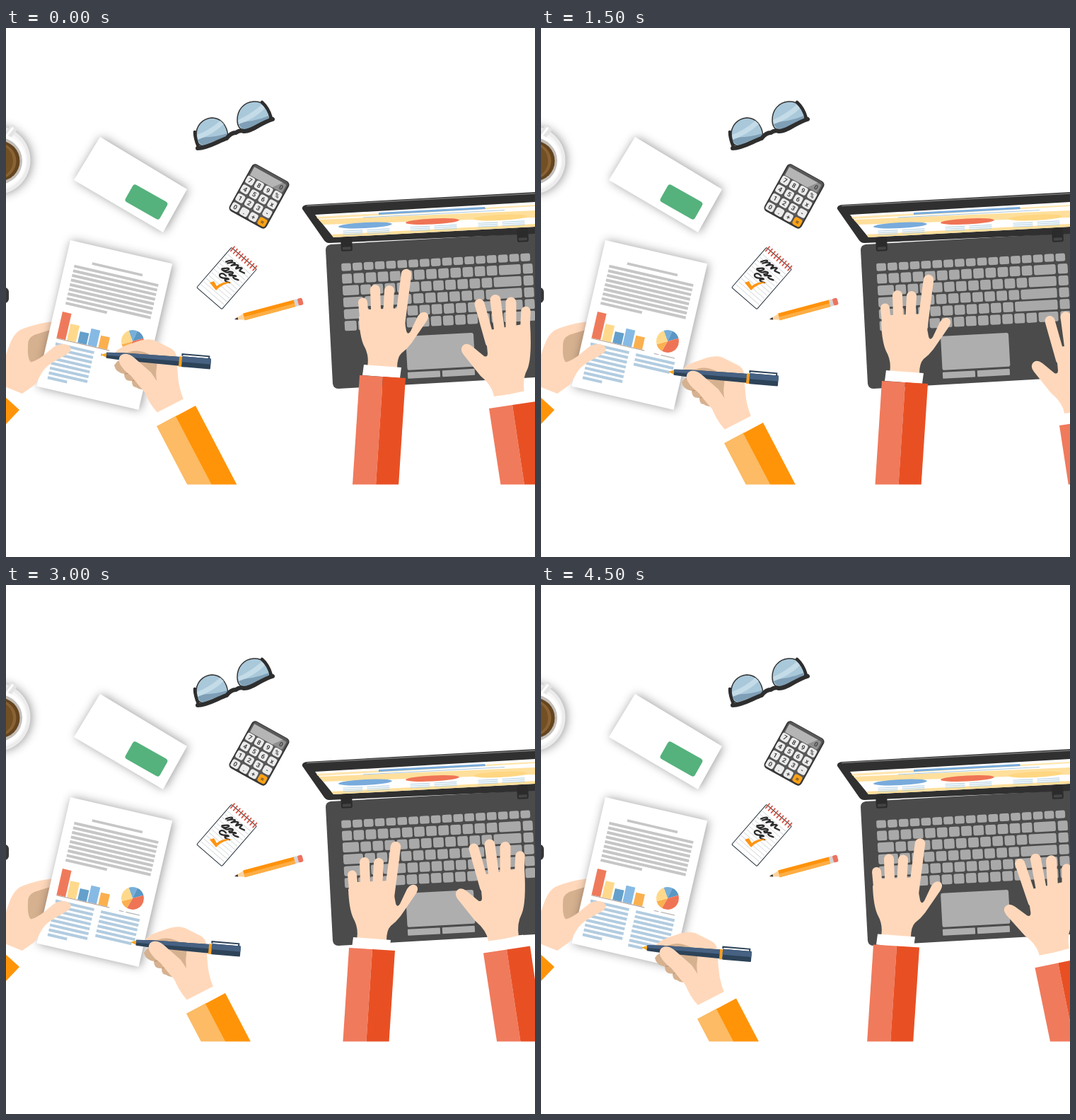
These frames come from a looping animation (748x748 px, 5000 ms). An HTML page:

```html
<!DOCTYPE html>
<html lang="en">
<head>
<meta charset="utf-8">
<title>Desk</title>
<style>
html, body { margin: 0; width: 100%; height: 100%; overflow: hidden; background: #fff; }
svg { display: block; width: 100vw; height: 100vh; }
text { font: 700 9px Roboto, sans-serif; text-anchor: middle; fill: #444; }
.soft { filter: drop-shadow(2px 0 7px #0006); }
.skin { fill: #ffd8bb; }
.finger { stroke: #ffd8bb; stroke-linecap: round; }
.shade { fill: #d6b190; }
</style>
</head>
<body>
<svg id="stage" viewBox="0 0 748 748"></svg>
<script>
const rect = (x, y, w, h, fill, r = 0) =>
  `<rect x="${x}" y="${y}" width="${w}" height="${h}" rx="${r}" fill="${fill}"/>`;
const path = (d, fill, more = '') => `<path d="${d}" fill="${fill}" ${more}/>`;
const poly = (points, fill) => `<polygon points="${points}" fill="${fill}"/>`;
const circle = (x, y, r, fill) => `<circle cx="${x}" cy="${y}" r="${r}" fill="${fill}"/>`;
const stroke = (d, color, width, more = '') =>
  `<path d="${d}" fill="none" stroke="${color}" stroke-width="${width}" ${more}/>`;
const group = (transform, body) => `<g transform="${transform}">${body}</g>`;
const repeat = (n, make) => Array.from({ length: n }, (_, i) => make(i)).join('');
const round = 'stroke-linecap="round" stroke-linejoin="round"';
const finger = (d, width) => `<path class="finger" d="${d}" stroke-width="${width}"/>`;
const skin = d => `<path class="skin" d="${d}"/>`;
const shade = d => `<path class="shade" d="${d}"/>`;

function cup() {
  return `<g class="soft">${circle(-14, 187, 48.5, '#ececec')}</g>` +
    circle(-13, 187, 43, '#f7f7f7') +
    group('translate(-4 160) rotate(-53)', rect(0, -5, 27, 11, '#e4e4e4', 4) + rect(4, -2, 20, 3, '#fff', 1)) +
    circle(-10, 188, 38, '#fff') + circle(-10, 188, 33, '#c2bdb8') +
    circle(-9, 188, 28.5, '#65451f') + circle(-11, 188, 25.5, '#8a6233') + circle(-14, 188, 24, '#735024');
}

function envelope() {
  return `<g class="soft">${poly('133,154 256,228 222,289 96,215', '#fff')}</g>` +
    group('translate(181 220) rotate(29.5)', rect(0, 0, 56, 28, '#55b27c', 4));
}

function glasses() {
  const leftLens = 'M269 153C268 138 278 128 291 127C304 127 312 137 314 152L312 157C300 160 290 167 279 167C272 166 268 160 269 153Z';
  const rightLens = 'M327 130C327 116 336 105 350 104C362 103 371 111 373 124L372 130C361 132 352 142 341 145C331 146 327 139 327 130Z';
  return [leftLens, rightLens].map(d => path(d, '#a9c8da', 'stroke="#333" stroke-width="1.5"')).join('') +
    path('M270 154Q292 156 313 149L312 156Q296 158 279 166Q271 163 270 154Z', '#7f9fb6') +
    path('M270 151Q287 145 303 131L308 136Q292 151 271 158Z', '#c4dbe8') +
    path('M328 133Q350 133 372 124L371 130Q355 136 341 144Q330 143 328 133Z', '#7f9fb6') +
    path('M328 130Q346 122 362 108L367 113Q351 129 329 136Z', '#c4dbe8') +
    stroke('M271 170C285 170 300 160 312 156Q318 148 325 148Q331 144 336 146C347 147 358 135 377 129', '#2e2e2e', 6, round) +
    stroke('M267 147Q267 156 272 168M362 105Q371 113 375 127', '#2e2e2e', 4.5, round);
}

function calculator() {
  const keys = '789%456x123-0.+=';
  return group('translate(358 238) rotate(29)',
    rect(-30, -38, 60, 76, '#383838', 6) + rect(-28, -37, 56, 72, '#585858', 5) +
    rect(-26, -33, 52, 13, '#8f8f8f', 2) + path('M-26-33H20L10-20H-26Z', '#b5b5b5') +
    `<text x="21" y="-23" font-style="italic">0</text>` +
    repeat(16, i => {
      const x = -22 + i % 4 * 14.5, y = -13.5 + (i >> 2) * 14.3;
      return rect(x - 6, y - 5.5, 12, 11.5, i == 15 ? '#fea215' : '#ececec', 3) +
        `<text x="${x}" y="${y + 3.4}">${keys[i]}</text>`;
    }));
}

function notepad() {
  return group('translate(312 354) rotate(41)',
    rect(-24, -38, 48, 76, '#26323c', 2) + rect(-23, -37, 46, 74, '#fff', 1) +
    repeat(11, i => rect(-22, -27 + i * 5.7, 44, .8, '#d3d7da')) +
    repeat(9, i => stroke(`M${-21 + i * 5.2}-33v-8`, '#d75545', 1.8, round)) +
    stroke('M-16-17q4-8 6-7q1 2-3 7q6-8 8-7q0 3-2 6q6-8 8-6q-1 4 0 5q4-7 6-6q-1 4 0 5l7-2' +
      'M-14-6q7-8 8-6q0 5-7 7q9 0 10-5q5-4 5 0q-6 4-1 4q5-5 7-5q-5 5 1 4l5-2' +
      'M-3-2q-7-1-8 4q1 4 7 1q5-5 7-4q-3 4-4 3q1 4 8 0', '#2c2c2c', 2.3, round)) +
    path('M288 360L294 358L298 365Q307 357 320 360Q306 361 297 371Z', '#ff9412');
}

function pencil() {
  return group('translate(323 412) rotate(-15)',
    poly('0,0 16,-5 16,5', '#fbd3a0') + poly('0,0 5,-1.8 5,1.8', '#333') +
    rect(14, -5, 75, 10, '#ff920b') + rect(14, 0, 75, 5, '#fdae45') +
    rect(88, -5, 5, 10, '#d5d5d5') + rect(93, -5, 7, 10, '#ed735f', 2));
}

// The top row has flat keys; each lower row starts and ends with a wider key.
function keyboard() {
  const key = (x, y, w, h) => rect(x.toFixed(1), y.toFixed(1), w.toFixed(1), h, '#a9a9a9', 2.5);
  const pitch = 17.15;
  return repeat(17, i => key(i * 15.85, 0, 13.6, 11)) +
    [14, 23, 28, 36, 17].map((first, row) => {
      const y = 14.8 + row * 16.7, count = row < 4 ? 12 - row : 12;
      const x = first + 2.3, last = x + count * pitch;
      return key(0, y, first, 14) + repeat(count, i => key(x + i * pitch, y, 14.8, 14)) +
        key(last, y, 253 - last, 14) + key(256, y, 14, 14);
    }).join('');
}

function laptop() {
  const ovals = [[508, 279, '#78abdc'], [603, 273.5, '#ef7455'], [699, 268, '#ffd681']];
  return path('M452 314Q452 307 459 306L748 290V494L470 510Q463 510 462 503Z', '#4b4b4b') +
    path('M419 256Q418 251 425 250L748 232V291L457 304Q452 304 449 299Z', '#303030') +
    stroke('M425 251.5L748 234', '#777', 1.5) +
    poly('437,264 748,246 748,281 463,296', '#fff') +
    poly('439,267 748,250 748,252 441,270', '#ffe5ad') +
    poly('442,271 748,258 748,268 449,278', '#ffdf9b') +
    poly('460,292 748,277 748,281 463,296', '#ffdf9b') +
    poly('527,261 677,253 678,256 527,264', '#78abdc') +
    stroke('M505 268L705 257.5', '#a9c7df', 1) +
    ovals.map(([x, y, fill]) => group(`translate(${x} ${y}) rotate(-3)`,
      `<ellipse rx="38" ry="4" fill="${fill}"/>` +
      repeat(3, i => rect(-32, 6 + i * 2.5, 28, 1.2, '#b8d5e6') + rect(2, 6 + i * 2.5, 32, 1.2, '#b8d5e6')))).join('') +
    [[473, 296], [722, 283]].map(([x, y]) => group(`translate(${x} ${y}) rotate(-3)`,
      rect(0, 0, 16, 20, '#2b2b2b', 3) + rect(2, 14, 12, 4, '#444', 1))).join('') +
    group('translate(474 333) rotate(-3.15)', keyboard()) +
    group('translate(565 436) rotate(-3.15)', rect(0, 0, 96, 48, '#aeaeae', 3) +
      rect(0, 51, 46, 9, '#aeaeae', 1) + rect(49, 51, 46, 9, '#aeaeae', 1));
}

function sector(from, to, fill) {
  const at = deg => [16 * Math.cos(deg * Math.PI / 180), 16 * Math.sin(deg * Math.PI / 180)];
  return path(`M0 0L${at(from)}A16 16 0 0 1 ${at(to)}Z`, fill);
}

function paper() {
  const bars = [[12, 101, '#ef7a5b'], [27, 115, '#ffd98b'], [42.5, 122.5, '#64a0cb'], [57, 115, '#86bae4'], [72.5, 121.5, '#fbb04f']];
  return group('translate(91 300) rotate(13)',
    `<g class="soft">${rect(0, 0, 148, 212, '#fff')}</g>` +
    rect(37.5, 23.5, 73, 3.5, '#c6c6c6') +
    repeat(9, i => rect(13.5, 32.5 + i * 6.7, i < 8 ? 122 : 60, 4, '#c6c6c6')) +
    bars.map(([x, y, fill]) => rect(x, y, 13, 139 - y, fill)).join('') +
    rect(12, 139, 77, 1.2, '#b9a79f') +
    repeat(8, i => rect(12.5, 145.5 + i * 7, i < 7 ? 56 : 28, 4, '#b2cce0')) +
    repeat(8, i => `<rect class="written" x="78.5" y="${146 + i * 6.9}" height="4" fill="#b2cce0"/>`) +
    rect(103, 140, 7, 1.4, '#c0c0c0') + rect(113, 140, 20, 1.4, '#c0c0c0')) +
    group('translate(179 443)', sector(-110, -65, '#77afd9') + sector(-65, -15, '#5a97c4') +
      sector(-15, 120, '#ef7455') + sector(120, 165, '#fbb04f') + sector(165, 250, '#ffd98b'));
}

const holdingPalm = () =>
  skin('M0 462C6 444 10 433 20 427C36 420 50 417 68 415V470L30 500L0 508Z') +
  shade('M31 449Q30 439 40 434Q52 430 66 426L56 470L36 473Q30 470 31 449Z');

const holdingThumb = () =>
  poly('-2,506 22,517 19,540 -2,522', '#fff') +
  skin('M-2 507V472L30 474C46 471 56 460 69 450C81 443 97 449 90 458C84 464 70 469 60 477C50 484 47 497 40 505L23 517Z') +
  poly('-2,521 19,540 -2,562', '#ff9409');

function pen() {
  return group('translate(134 462) rotate(4.8)',
    poly('0,0 9,-3.5 9,3.5', '#f5a623') +
    path('M8-4L30-5.3L112-6.3V6.5L30 5.3L8 4Z', '#2d4358') + path('M8-4L30-5.3L112-6.3V0H8Z', '#466182') +
    rect(111, -7, 4, 14.5, '#ff9f1c') +
    rect(115, -7.5, 41, 15, '#2d4358', 1) + rect(115, -7.5, 41, 8, '#466182', 1) +
    stroke('M115-8V-10.5H153V-7', '#2d4358', 2));
}

function writingHand() {
  return shade('M153 477Q157 469 170 467L200 480L199 510Q190 513 184 508Q178 508 178 499Q167 500 167 489Q155 487 153 477Z') +
    stroke('M168 489Q174 489 177 484M179 499Q184 498 187 494', '#b98f6d', 1) +
    skin('M152 464C154 455 165 450 178 446C192 440 204 438 213 443L233 453Q241 457 241 466L243 491Q244 508 251 525L215 545Q201 530 195 511L172 470Q158 471 152 464Z') +
    shade('M166 462Q178 455 190 457Q203 460 214 468L213 480Q210 498 219 516L200 492L176 466Z') +
    pen() +
    skin('M161 475Q157 464 166 461Q174 460 181 466L205 487L222 512L223 534L205 530Q196 513 190 508L176 491Q166 484 161 475Z') +
    poly('211,545 252,524 268,534 213,563', '#fff') +
    poly('213,563 241,548 393,840 358,840', '#fcbb64') + poly('240,549 268,534 428,840 393,840', '#ff9409');
}

function leftTypingHand() {
  return skin('M499 408L512 398L560 396L566 428Q568 435 572 429L582 408Q588 399 595 403Q600 407 593 417L573 446Q567 454 559 460Q553 466 553 481L511 479Q514 463 506 449Q500 436 499 408Z') +
    finger('M504.5 388L508 425', 13) + finger('M522 370L524 425', 14) +
    finger('M542 371L539 425', 14) + finger('M566 348L556 425', 14.5) +
    poly('506,476 559,480 557,495 504,491', '#fff') +
    poly('500,491 533,493 513,800 480,800', '#f07a5c') + poly('533,493 565,495 545,800 513,800', '#e85024');
}

function rightTypingHand() {
  return skin('M678 428L741 417Q744 467 737 483Q730 496 733 515L690 521Q688 506 671 492L647 462Q641 454 646 449Q651 444 659 450L676 464Q681 466 681 460Z') +
    finger('M669.5 390L685 445', 14) + finger('M692 384.5L700 445', 15) +
    finger('M714 388L714 445', 15) + finger('M735 400.5L733 445', 13.5) +
    poly('688,523 739,512 742,529 690,539', '#fff') +
    poly('683,538 716,533 756,800 723,800', '#f07a5c') + poly('716,533 749,528 789,800 756,800', '#e85024');
}

document.getElementById('stage').innerHTML =
  rect(0, 0, 748, 748, '#fff') + rect(-20, 367, 24, 22, '#363636', 6) +
  cup() + envelope() + glasses() + calculator() + notepad() + pencil() +
  laptop() + holdingPalm() + paper() + holdingThumb() +
  `<g id="writer">${writingHand()}</g><g id="typeLeft">${leftTypingHand()}</g><g id="typeRight">${rightTypingHand()}</g>` +
  rect(0, 645.5, 748, 103, '#fff');

const [writer, typeLeft, typeRight] = ['writer', 'typeLeft', 'typeRight'].map(id => document.getElementById(id));
const written = document.querySelectorAll('.written');

// writer x y, line being written, left hand x y, right hand x y angle
const poses = [
  [0, 0, 1, 0, 0, 0, 0, 0],
  [49, 16, 2, -6, 0, 11, 9, 0],
  [-2, 13.5, 3, -12, 9, 21, 18, 0],
  [46, 24, 3, -18, 8, 50, 24, 0],
  [-6, 20, 4, -23, 45, 82, 28, 0],
  [44, 37, 5, -19, 33, 36, -60, 0],
  [42, 43, 6, -15, 22, -8, -17.5, 0],
  [-9, 39, 7, 19.5, 9, -2.5, -63, 0],
  [39, 50, 7, -60.5, -7, -54, -41, -10],
  [8, 50.5, 8, -30, 17.5, 11, 5, -3]
];

function draw(now) {
  const [wx, wy, line, lx, ly, rx, ry, angle] = poses[Math.floor(now % 5000 / 500)];
  writer.setAttribute('transform', `translate(${wx} ${wy})`);
  typeLeft.setAttribute('transform', `translate(${lx} ${ly})`);
  typeRight.setAttribute('transform', `translate(${rx} ${ry}) rotate(${angle} 650 452)`);
  const tip = (43 + wx) * .974 + (162 + wy) * .225 + 2;
  written.forEach((bar, i) =>
    bar.setAttribute('width', i + 1 < line ? 56 : i + 1 == line ? Math.max(0, tip - 78.5) : 0));
}

const start = performance.now();
function tick() {
  draw(performance.now() - start);
  requestAnimationFrame(tick);
}
tick();
</script>
</body>
</html>
```
